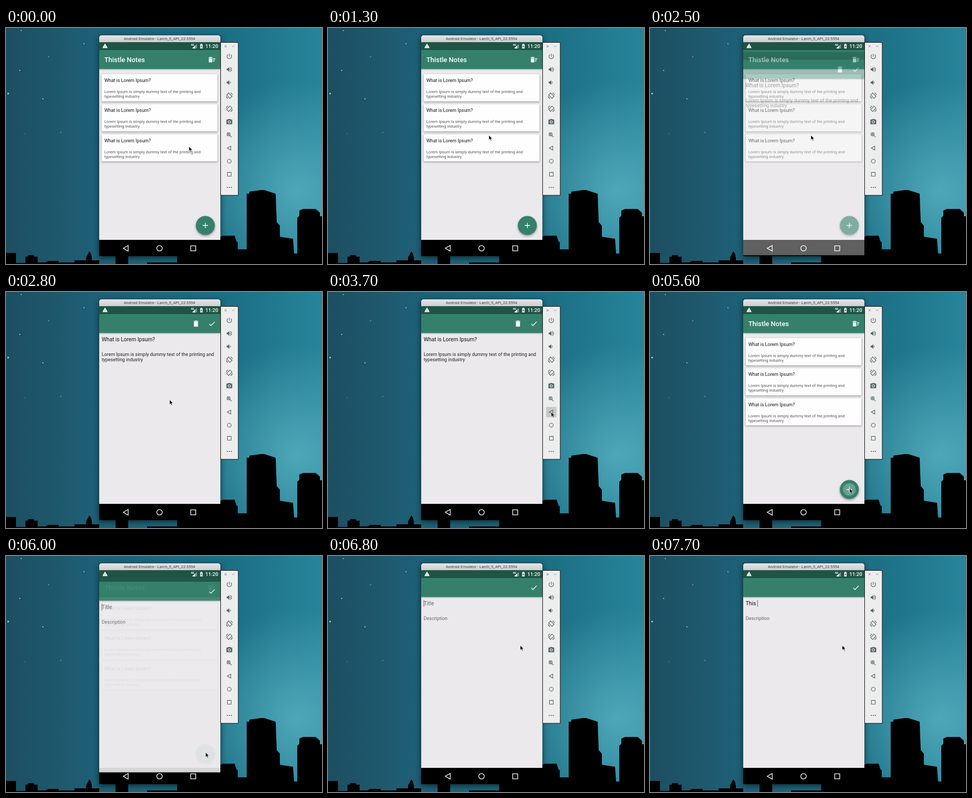
An HTML page that plays this animation: 600 px wide and 450 px high, repeating every 8000 ms.

```html
<!DOCTYPE html>
<html lang="en">
<head>
<meta charset="utf-8">
<title>Note app</title>
<style>
  html, body { margin: 0; width: 100%; height: 100%; overflow: hidden; background: #1e6076; }
  svg { display: block; width: 600px; height: 450px; }
  text { font-family: Roboto, sans-serif; white-space: pre; }
  .heading { font-size: 8.94px; fill: #161616; }
  .summary { font-size: 7.67px; fill: #555; }
  .title { font-size: 10.22px; fill: #111; }
  .body { font-size: 8.94px; fill: #222; }
  .line { fill: none; stroke: #fff; stroke-width: 1.3; }
  .card { fill: #fefefe; filter: drop-shadow(0 1.5px 1.8px rgba(0, 0, 0, .45)); }
  .bar { fill: #35806a; filter: drop-shadow(0 1px 1.2px rgba(0, 0, 0, .4)); }
  .tool { fill: none; stroke: #546669; stroke-width: 2; }
  .tool .solid { fill: #546669; stroke: none; }
</style>
</head>
<body>
<svg viewBox="0 0 600 450">
  <defs>
    <linearGradient id="sky">
      <stop offset="0" stop-color="#1d4e61"/>
      <stop offset=".3" stop-color="#1e6177"/>
      <stop offset=".72" stop-color="#1c7086"/>
      <stop offset="1" stop-color="#27849a"/>
    </linearGradient>
    <radialGradient id="glow" gradientUnits="userSpaceOnUse" cx="550" cy="310" r="210">
      <stop offset="0" stop-color="#64bccb" stop-opacity=".65"/>
      <stop offset="1" stop-color="#64bccb" stop-opacity="0"/>
    </radialGradient>
    <linearGradient id="chrome" x2="0" y2="1">
      <stop offset="0" stop-color="#e6e4e6"/>
      <stop offset="1" stop-color="#cfcdcf"/>
    </linearGradient>
    <clipPath id="screen"><path d="M177 27h230v408H177z"/></clipPath>
    <g id="card">
      <rect class="card" x="181.5" y="88" width="220" height="52" rx="1"/>
      <text class="heading" x="186.7" y="103.2">What is Lorem Ipsum?</text>
      <text class="summary" x="186.7" y="124.2">Lorem Ipsum is simply dummy text of the printing and</text>
      <text class="summary" x="186.7" y="133.2">typesetting industry</text>
    </g>
    <g id="page">
      <path fill="#1f5445" d="M177 27h230v15H177z"/>
      <rect class="sheet" x="177" y="78" width="230" height="326" fill="#ebe9ec"/>
      <path class="bar" d="M177 42h230v36H177z"/>
    </g>
    <path id="check" d="M4.1 12.7l4.9 4.9L20.3 6.3" fill="none" stroke="#fff" stroke-width="2"
      transform="translate(383.3 52.8) scale(.639)"/>
  </defs>

  <!-- Desktop -->
  <path fill="url(#sky)" d="M0 0h600v450H0z"/>
  <path fill="url(#glow)" d="M0 0h600v450H0z"/>
  <g id="stars" fill="#b9e2dc"></g>
  <path d="M0 450V429H19V448H37V436H42V433H53V436H60V447H75L80 444H100V447H130V443H152V438L156 430L158 426L161 430L163 438V443H177V450H208V434H232V450H268V447H325V434H407V398L412 396H434L438 408H440V422H457V316H462V312L484 309H490L512 316L514 370L520 377V398L545 402L547 430H553V362L557 358V348L564 345H588L596 352V359H600V450Z"/>

  <!-- Emulator window -->
  <path d="M177 14h230v421H177z" style="filter:drop-shadow(0 3px 6px rgba(0,0,0,.6))"/>
  <path fill="url(#chrome)" d="M177 27V18q0-4 4-4H403q4 0 4 4V27z"/>
  <text x="291.5" y="23.4" font-size="7.5" fill="#444" text-anchor="middle">Android Emulator - Larch_5_API_22:5554</text>

  <g clip-path="url(#screen)">
    <path d="M177 27h230v408H177z"/>
    <use href="#page"/>
    <text x="186.7" y="65.2" font-size="12.9" font-weight="500" fill="#fff">Thistle Notes</text>
    <path fill="#fff" transform="translate(383.3 52.6) scale(.639)"
      d="M15 16h4v2h-4zM15 8h7v2h-7zM15 12h6v2h-6zM3 8h10v12H3zM2 5h3l1-1h4l1 1h3v2H2z"/>
    <use href="#card"/><use href="#card" y="57.2"/><use href="#card" y="114.4"/>
    <circle cx="378.5" cy="376.5" r="18" fill="#35806a" style="filter:drop-shadow(0 2px 2px rgba(0,0,0,.4))"/>
    <circle id="ripple" cx="378.5" cy="376.5" fill="#fff" opacity=".25"/>
    <path class="line" d="M373.5 376.5h10M378.5 371.5v10"/>

    <g id="detail">
      <use href="#page"/>
      <path fill="#fff" transform="translate(353 52.6) scale(.639)" d="M6 7h12v14H6zM5 4h3.5l1-1h5l1 1H19v2H5z"/>
      <use href="#check"/>
      <text class="title" x="181.7" y="94">What is Lorem Ipsum?</text>
      <text class="body" x="181.7" y="122.2">Lorem Ipsum is simply dummy text of the printing and</text>
      <text class="body" x="181.7" y="132.4">typesetting industry</text>
      <rect id="detailCaret" x="181.3" y="84" width="1" height="13" fill="#b23a63"/>
    </g>

    <g id="form">
      <use href="#page"/>
      <use href="#check"/>
      <text class="title" id="hint" x="181.7" y="94" style="fill:#666">Title</text>
      <text class="title" id="typed" x="181.7" y="94"></text>
      <text class="body" x="181.7" y="122.2" style="fill:#666">Description</text>
      <rect id="formCaret" y="84" width="1" height="13" fill="#b23a63"/>
    </g>

    <!-- System bars -->
    <path fill="#fff" fill-rule="evenodd" transform="translate(182.5 28.7) scale(.46)"
      d="M1 21h22L12 2zM13 18h-2v-2h2zM13 14h-2v-4h2z"/>
    <text x="351" y="34" font-size="5" font-weight="700" fill="#fff">4G</text>
    <path fill="#fff" opacity=".4" d="M362.5 30v9h-9z"/>
    <path fill="#fff" d="M359 33.5v5.5h-5.5z"/>
    <path fill="#fff" fill-rule="evenodd" transform="translate(365.5 29) scale(.46)"
      d="M7 4h3V2h4v2h3v18H7zM11 20l4-7.5h-2V7l-4 7.5h2z"/>
    <text x="378.6" y="38.3" font-size="9.6" font-weight="500" fill="#fff">11:20</text>
    <path class="line" d="M222.6 420l9.4-5.4v10.8zM350.7 415.3h9.6v9.6h-9.6z"/>
    <circle class="line" cx="291.5" cy="420" r="5.2"/>
  </g>

  <!-- Emulator controls -->
  <path d="M407.5 27.5h33.5v291.5h-33.5z" fill="#ededed" stroke="#111"/>
  <path d="M415 33l4 4m0-4l-4 4M429 35h4.5" stroke="#8a8a8a" stroke-width=".9"/>
  <rect id="pressed" x="414" y="219" width="20" height="20" rx="2" fill="#c9c9c9"/>
  <g id="tools"></g>

  <path id="pointer" d="M0 0v9l2.1-2 1.5 3.4 1.5-.7-1.5-3.2h2.8z" stroke="#fff" stroke-width=".6"/>
</svg>
<script>
const LOOP = 8000;
const $ = id => document.getElementById(id);
const clamp = v => Math.min(1, Math.max(0, v));
const progress = (t, start, length) => clamp((t - start) / length);
const show = (id, on) => $(id).setAttribute("visibility", on ? "inherit" : "hidden");

const stars = [[29, 5, .9], [81, 55, .8], [4, 125, 1.5], [26, 81, .9], [70, 135, 1], [104, 199, .8], [36, 202, .5], [148, 30, .9]];
$("stars").innerHTML = stars.map(([x, y, r]) => `<circle cx="${x}" cy="${y}" r="${r}"/>`).join("");

const rotate = '<path d="M9.6 2.6l-7 7 11.8 11.8 7-7zM16 2a10 10 0 0 1 6.5 8M8 22a10 10 0 0 1-6.5-8"/>';
const speaker = '<path class="solid" d="M3 9h4l5-5v16l-5-5H3zM14 8a4.5 4.5 0 0 1 0 8z"/>';
const tools = [
  '<path d="M12 3v10M7 6a8 8 0 1 0 10 0"/>',
  speaker + '<path d="M14 4.3a8 8 0 0 1 0 15.4"/>',
  speaker,
  rotate,
  `<g transform="matrix(-1 0 0 1 24 0)">${rotate}</g>`,
  '<path class="solid" d="M2 4h5l2-2h6l2 2h5v16H2z"/><circle cx="12" cy="12" r="4" stroke="#ededed"/>',
  '<circle cx="9.5" cy="9.5" r="5.5"/><path d="M14 14l6 6M6.5 9.5h6M9.5 6.5v6"/>',
  '<path d="M5 12l12-7v14z"/>',
  '<circle cx="12" cy="12" r="6.8"/>',
  '<path d="M5.5 5.5h13v13h-13z"/>',
  '<g class="solid"><circle cx="5" cy="12" r="2"/><circle cx="12" cy="12" r="2"/><circle cx="19" cy="12" r="2"/></g>'
];
$("tools").innerHTML = tools.map((icon, i) =>
  `<g class="tool" transform="translate(417.4 ${47.4 + 25 * i}) scale(.55)">${icon}</g>`).join("");

// Each page needs its own stretchable sheet, so references become copies.
for (const id of ["detail", "form"]) {
  const copy = $("page").cloneNode(true);
  copy.removeAttribute("id");
  $(id).querySelector("use").replaceWith(copy);
}

function placePage(id, offset, alpha) {
  const page = $(id);
  page.setAttribute("transform", `translate(0 ${offset})`);
  page.setAttribute("opacity", alpha);
  page.querySelector(".sheet").setAttribute("height", 326 + 18 * (1 - alpha));
}

function openPage(id, t, start) {
  const p = progress(t, start, 400);
  placePage(id, 32.6 * (1 - p) ** 2, Math.min(1, p * 1.7));
}

function closePage(id, t, start) {
  const p = progress(t, start, 250);
  placePage(id, 32.6 * p * p, 1 - p);
}

// start, duration, x, y
const moves = [[0, 1, 347.5, 226], [50, 1050, 305.5, 204.5], [2700, 800, 424, 229], [4400, 850, 379, 374.5], [6080, 350, 365, 170.5]];
const keys = [[6950, "T"], [7300, "Th"], [7500, "Thi"], [7600, "This"], [7700, "This "]];

function placePointer(t) {
  let [, , x, y] = moves[0];
  for (const [start, length, toX, toY] of moves) {
    const p = progress(t, start, length);
    const eased = p * p * (3 - 2 * p);
    x += (toX - x) * eased;
    y += (toY - y) * eased;
  }
  $("pointer").setAttribute("transform", `translate(${x} ${y})`);
}

function draw(t) {
  placePointer(t);

  if (t < 3800) openPage("detail", t, 2404);
  else closePage("detail", t, 3800);
  show("detailCaret", Math.floor((t - 2200) / 500) % 2 === 0);
  show("pressed", t >= 3550 && t < 3900);

  $("ripple").setAttribute("r", 18 * progress(t, 5400, 300));
  openPage("form", t, 5786);

  const text = keys.reduce((last, [at, value]) => t >= at ? value : last, "");
  const typed = $("typed");
  typed.textContent = text;
  show("hint", !text);
  $("formCaret").setAttribute("x", 181.5 + (text ? typed.getComputedTextLength() : 0));
}

const begin = performance.now();
function tick() {
  draw((performance.now() - begin) % LOOP);
  requestAnimationFrame(tick);
}
tick();
</script>
</body>
</html>
```
